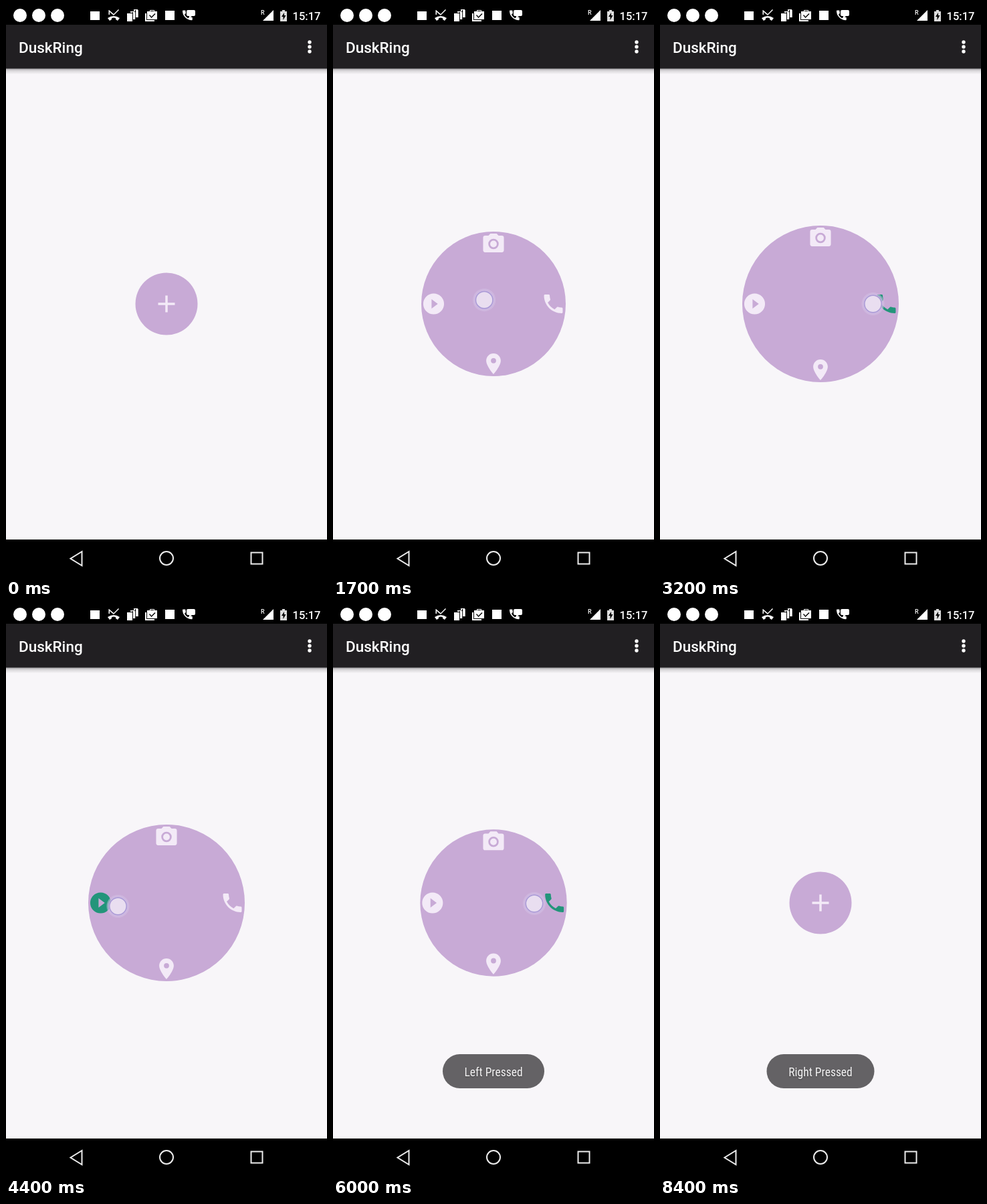
These frames come from a looping animation (480 by 853 pixels, 9100 ms). An HTML page:

```html
<!DOCTYPE html>
<html lang="en">
<head>
<meta charset="utf-8">
<title>Radial menu</title>
<style>
  html, body { margin: 0; width: 100%; height: 100%; overflow: hidden; background: #f8f6f9; }
  svg { display: block; width: 100%; height: 100%; }
  text { font-family: Roboto, Inter, sans-serif; font-weight: 500; fill: #fff; }
  .toast rect { fill: #646265; }
  .toast text {
    font: 400 17.5px "Roboto Condensed", Roboto, sans-serif; font-stretch: 75%;
    fill: #f4f3f4; text-anchor: middle; text-shadow: 0 1px 2px #444;
  }
</style>
</head>
<body>
<svg viewBox="0 0 480 853">
  <defs>
    <linearGradient id="shade" x2="0" y2="1">
      <stop stop-color="#000" stop-opacity=".38"/>
      <stop offset=".4" stop-color="#000" stop-opacity=".13"/>
      <stop offset="1" stop-color="#000" stop-opacity="0"/>
    </linearGradient>
    <path id="phone" d="M6.62 10.79c1.44 2.83 3.76 5.14 6.59 6.59l2.2-2.2c.27-.27.67-.36 1.02-.24 1.12.37 2.33.57 3.57.57.55 0 1 .45 1 1V20c0 .55-.45 1-1 1-9.39 0-17-7.61-17-17 0-.55.45-1 1-1h3.5c.55 0 1 .45 1 1 0 1.25.2 2.45.57 3.57.11.35.03.74-.25 1.02z"/>
    <path id="pin" d="M12 2C8.13 2 5 5.13 5 9c0 5.25 7 13 7 13s7-7.75 7-13c0-3.87-3.13-7-7-7zm0 9.5a2.5 2.5 0 1 1 0-5 2.5 2.5 0 0 1 0 5z"/>
    <path id="play" d="M12 2a10 10 0 1 0 0 20 10 10 0 0 0 0-20zm-2 14.5v-9l6 4.5z"/>
    <path id="camera" d="M9 2 7.17 4H4a2 2 0 0 0-2 2v12a2 2 0 0 0 2 2h16a2 2 0 0 0 2-2V6a2 2 0 0 0-2-2h-3.17L15 2zm3 15a5 5 0 1 1 0-10 5 5 0 0 1 0 10zm0-8.2a3.2 3.2 0 1 0 0 6.4 3.2 3.2 0 0 0 0-6.4z"/>
  </defs>

  <rect width="480" height="853" fill="#f8f6f9"/>
  <rect y="93" width="480" height="9" fill="url(#shade)"/>
  <rect y="28" width="480" height="65.5" fill="#211f22"/>
  <rect width="480" height="28" fill="#000"/>
  <rect y="797" width="480" height="56" fill="#000"/>

  <!-- status bar -->
  <g fill="#fff">
    <circle cx="21" cy="14" r="10"/><circle cx="49" cy="14" r="10"/><circle cx="77" cy="14" r="10"/>
    <rect x="126" y="8" width="14" height="13"/>
    <path d="M154 6l7 6 7-7 1 1-8 8-6-5v4h-1.500V6zM152 18q9-6 18 0l-3 4-3-2v-2q-3-1-6 0v2l-3 2z"/>
    <path d="M181 11h8v12h-8zM190 9h3.200v11H190zM194.200 6h3.500v11h-3.500zM186 8h6v1h-3v1h-3zM191 5h6v1h-4v2h-2z"/>
    <path d="M209 11v11h13" fill="none" stroke="#fff" stroke-width="2"/>
    <path fill-rule="evenodd" d="M211 8h4V6h7v2h4v12h-15zM216 8h5V7h-5zM214 14l3.500 4 6-6-1-1-5 5-2.500-3z"/>
    <rect x="238" y="7" width="14" height="14"/>
    <use href="#phone" transform="translate(261.500 4) scale(.82)"/>
    <path d="M272 6h9q2 0 2 2v5q0 2-2 2h-3l-4 3v-3h-2q-2 0-2-2V8q0-2 2-2z"/>
    <path d="M400 6v16h-16z"/>
    <path d="M413 6h4v2h3v15h-10V8h3z" fill="#ddd"/>
    <path d="M416 10l-4 6h2.500v5l4-7H416z" fill="#000"/>
    <circle cx="454" cy="54" r="2.700"/><circle cx="454" cy="61" r="2.700"/><circle cx="454" cy="68" r="2.700"/>
  </g>
  <text x="381" y="13" font-size="9">R</text>
  <text x="470.500" y="20.500" font-size="16.500" text-anchor="end">15:17</text>
  <text x="19" y="70" font-size="22.500">DuskRing</text>

  <!-- navigation bar -->
  <g fill="none" stroke="#ececec" stroke-width="2">
    <path d="M113.500 815v21L96.500 825.500z"/>
    <circle cx="240" cy="825" r="10"/>
    <rect x="366.500" y="816.500" width="17" height="17"/>
  </g>

  <circle id="disc" cx="240" cy="445" fill="#c8aad6"/>
  <path id="plus" d="M227.500 445h25M240 432.500v25" stroke="#f3eaf7" stroke-width="3.500"/>
  <g id="icons">
    <use href="#phone"/><use href="#pin"/><use href="#play"/><use href="#camera"/>
  </g>
  <g id="touch">
    <circle r="17" fill="#d5c3e7" opacity=".5"/>
    <circle r="15" fill="#cdbbe4" opacity=".6"/>
    <circle r="12.700" fill="#e9def0" stroke="#aa9ad6" stroke-width="1.500"/>
  </g>
  <g class="toast" id="left">
    <rect x="164" y="671" width="152" height="51" rx="25.500"/>
    <text x="240" y="703.500">Left Pressed</text>
  </g>
  <g class="toast" id="right">
    <rect x="159.500" y="671" width="161" height="51" rx="25.500"/>
    <text x="240" y="703.500">Right Pressed</text>
  </g>
</svg>
<script>
const LOOP = 9100, STEP = 100, CX = 240, CY = 445;
const OPEN_MS = 100, CLOSE_MS = 250;
const CLOSED_R = 46.5, OPEN_R = 108, GROW = 9;

// Each press: opening time, release time and finger path as [ms, degrees, distance].
const presses = [
  { open: 350, close: 1050, path: [[750, 203, 15], [950, 190, 45], [1050, 190, 52]] },
  { open: 1550, close: 4850, path: [[1800, 203, 15], [2100, 180, 80], [2700, 90, 88],
    [3200, 0, 78.5], [3800, -90, 104], [4400, -184, 72.7], [4850, -180, 82]] },
  { open: 5450, close: 6550, path: [[5800, 0, 14], [6000, 1, 61], [6200, 0, 82]] },
  { open: 7450, close: 8150, path: [[7500, -120, 12], [7900, -90, 55], [8100, -90, 80]] }
];

const $ = id => document.getElementById(id);
const icons = [...$("icons").children];
const ramp = (t, a, b) => Math.min(1, Math.max(0, (t - a) / (b - a)));
const mix = (a, b, k) => a + (b - a) * k;

function fingerAt(path, t) {
  let [, angle, dist] = path[0];
  for (let i = 1; i < path.length; i++) {
    const k = ramp(t, path[i - 1][0], path[i][0]);
    angle = mix(angle, path[i][1], k);
    dist = mix(dist, path[i][2], k);
  }
  return { angle, dist };
}

function draw(t) {
  const press = presses.find(p => t >= p.open && t < p.close + CLOSE_MS);
  let shown = 0, radius = CLOSED_R, picked = -1;
  $("touch").style.display = press && t < press.close ? "" : "none";

  if (press) {
    const { angle, dist } = fingerAt(press.path, Math.min(t, press.close));
    const rad = angle * Math.PI / 180;
    shown = ramp(t, press.open, press.open + OPEN_MS) * (1 - ramp(t, press.close, press.close + CLOSE_MS));
    radius = mix(CLOSED_R, OPEN_R + GROW * ramp(dist, 58.5, 72), shown);
    if (dist > 58.5 && t < press.close) picked = (Math.round(angle / 90) + 8) % 4;
    $("touch").setAttribute("transform",
      `translate(${CX + dist * Math.cos(rad)} ${CY + dist * Math.sin(rad)})`);
  }

  $("disc").setAttribute("r", radius);
  $("plus").style.opacity = 1 - shown;
  $("icons").style.opacity = shown;
  icons.forEach((icon, i) => {
    const a = i * Math.PI / 2, d = radius - 18.5;
    icon.setAttribute("transform",
      `translate(${CX + d * Math.cos(a)} ${CY + d * Math.sin(a)}) scale(1.555) translate(-12 -12)`);
    icon.setAttribute("fill", i === picked ? "#22957a" : "#f3eaf7");
  });
  $("left").style.opacity = ramp(t, 4900, 5300) * (1 - ramp(t, 7100, 7500));
  $("right").style.opacity = ramp(t, 6900, 7300);
}

const start = performance.now();
function tick() {
  const t = (performance.now() - start) % LOOP;
  draw(Math.floor(t / STEP) * STEP);
  requestAnimationFrame(tick);
}
tick();
</script>
</body>
</html>
```
